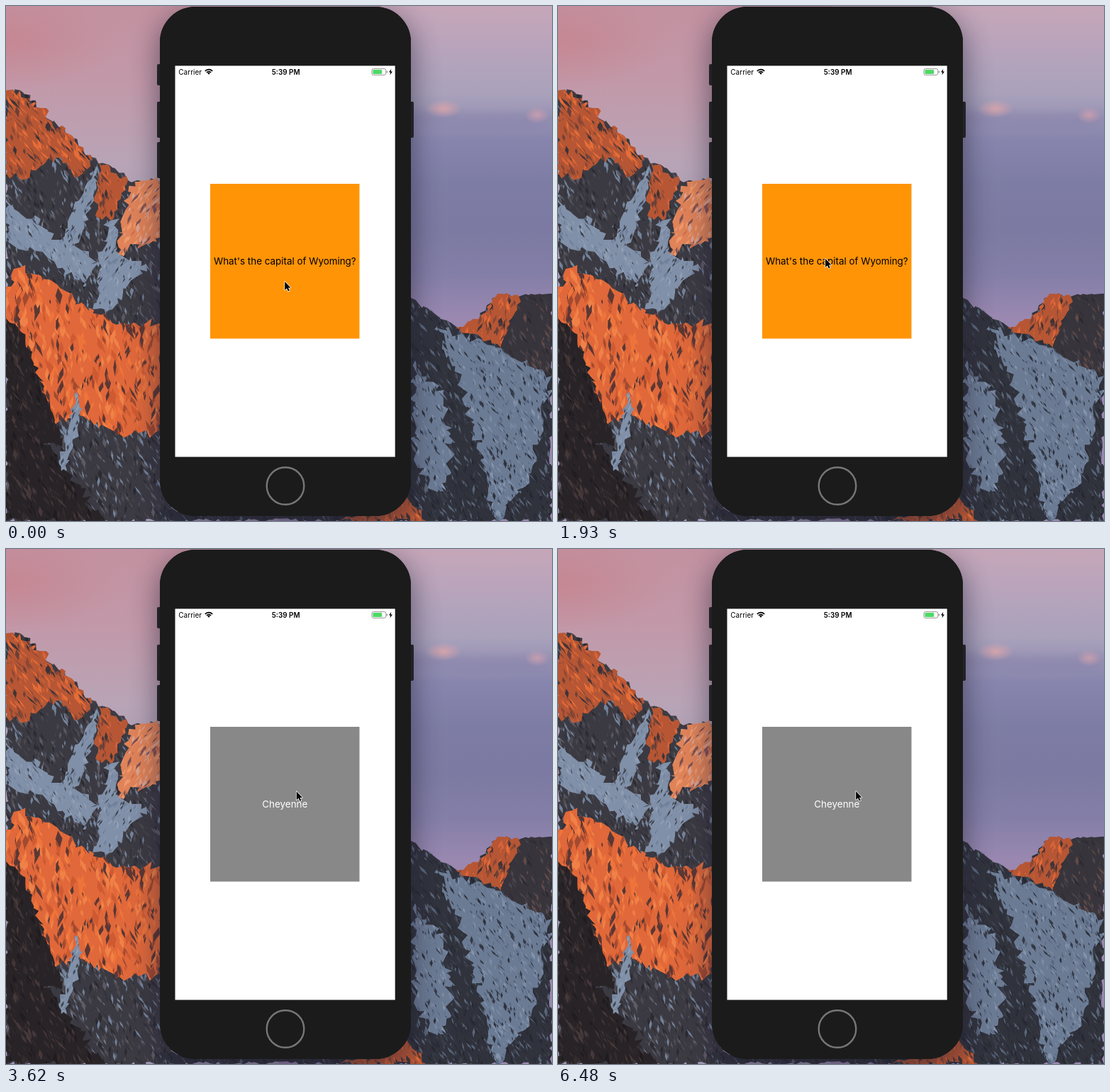
Animation, 770 px wide and 727 px high, one loop 8000 ms. Source, as an HTML page with a canvas:

```html
<!DOCTYPE html>
<html lang="en">
<head>
<meta charset="utf-8">
<title>Flip card</title>
<style>
html, body { margin: 0; width: 100%; height: 100%; overflow: hidden; background: #1b1b1b; }
canvas { display: block; }
</style>
</head>
<body>
<canvas id="stage" width="770" height="727"></canvas>
<script>
const W = 770, H = 727, LOOP = 8000, STEP = 90;
const ctx = document.getElementById('stage').getContext('2d');
const FONT = 'Inter, Roboto, sans-serif';

let seed = 11;
const rnd = () => (seed = (seed * 16807) % 2147483647) / 2147483647;
const spread = a => (rnd() - 0.5) * 2 * a;
const pick = list => list[Math.floor(rnd() * list.length)];

// Closed outline through a few key points, broken up by random offsets
function crag(pts, rough) {
  const path = new Path2D();
  pts.forEach(([x, y], i) => {
    const [nx, ny] = pts[(i + 1) % pts.length];
    const n = Math.ceil(Math.hypot(nx - x, ny - y) / 6);
    for (let k = 0; k < n; k++) {
      const j = k ? rough : 0;
      path.lineTo(x + (nx - x) * k / n + spread(j), y + (ny - y) * k / n + spread(j));
    }
  });
  path.closePath();
  return path;
}

// Rock face: jagged outline filled with thin slanted flakes
function face(g, text, tones, size, lean, rough = 4) {
  const pts = text.split(' ').map(p => p.split(',').map(Number));
  const xs = pts.map(p => p[0]), ys = pts.map(p => p[1]);
  const x0 = Math.min(...xs), y0 = Math.min(...ys);
  const w = Math.max(...xs) - x0, h = Math.max(...ys) - y0;
  g.save();
  g.clip(crag(pts, rough));
  g.fillStyle = tones[0];
  g.fillRect(x0 - 9, y0 - 9, w + 18, h + 18);
  for (let i = w * h / (size * 4); i > 0; i--) {
    const x = x0 + rnd() * w, y = y0 + rnd() * h;
    const len = size * (0.4 + rnd()), half = len * (0.08 + rnd() * 0.14);
    const dx = len * (lean + spread(0.5));
    g.fillStyle = pick(tones);
    g.beginPath();
    g.moveTo(x, y);
    g.lineTo(x + half + dx * 0.4, y + len * 0.45);
    g.lineTo(x + dx, y + len);
    g.lineTo(x - half + dx * 0.5, y + len * 0.5);
    g.fill();
  }
  g.restore();
}

function sky(g, x, colors) {
  const grad = g.createLinearGradient(0, 0, 0, 440);
  colors.forEach((c, i) => grad.addColorStop(i / (colors.length - 1), c));
  g.fillStyle = grad;
  g.fillRect(x, 0, W / 2, H);
}

function glow(g, x, y, rx, ry, rgb, a) {
  g.save();
  g.translate(x, y);
  g.scale(rx, ry);
  const grad = g.createRadialGradient(0, 0, 0, 0, 0, 1);
  grad.addColorStop(0, `rgba(${rgb},${a})`);
  grad.addColorStop(1, `rgba(${rgb},0)`);
  g.fillStyle = grad;
  g.fillRect(-1, -1, 2, 2);
  g.restore();
}

function drawSky(g) {
  sky(g, 0, ['#c391a0', '#c299a9', '#b8a4b6', '#a59bb5', '#a097b4']);
  sky(g, W / 2, ['#c6a6b8', '#b7a4bc', '#a9a1bb', '#8785ad', '#7d7ca4', '#7c7aa2', '#837ea7', '#9a88b0']);
  glow(g, 0, 50, 160, 70, '200,124,132', 0.55);
  for (let x = 576; x < W; x += 18) glow(g, x, 165 + spread(6), 34, 20, '139,134,172', 0.55);
  glow(g, 617, 145, 26, 13, '218,165,170', 0.9);
  glow(g, 749, 154, 18, 12, '206,160,174', 0.85);
}

const ROCK = ['#3b3a42', '#2b2a31', '#4a4850', '#35343d', '#5d5a64', '#74839a'];
const SNOW = ['#8090a8', '#92a0b6', '#71809a', '#3d424e', '#8797ae'];
const FIELD = ['#6b7b94', '#7c8ca5', '#58677f', '#343a47', '#2d313c', '#8494ab'];
const SLATE = ['#30323c', '#262831', '#3c404b', '#2c2e38', '#596679'];
const LIT = ['#e0683a', '#ee743b', '#cf5a31', '#f08248', '#5a3734', '#a24a30'];
const PEAK = ['#b65634', '#e56d38', '#6b4038', '#3e3337', '#d9643a', '#8a4735'];
const GLOW = ['#e08358', '#f09a6c', '#c8694a', '#7a5054', '#dca391'];
const DUSK = ['#282326', '#1f1b1f', '#352c2e', '#2c272b', '#46393a'];

function drawLeft(g) {
  face(g, '0,122 20,119 48,144 118,212 150,228 172,246 230,246 230,727 0,727', ROCK, 11, 0.4);
  face(g, '128,222 124,275 92,352 70,350 96,290', SNOW, 9, -0.3);
  face(g, '0,266 58,318 130,362 112,396 40,345 0,333', SNOW, 9, 0.5, 7);
  face(g, '142,306 160,300 150,345 198,364 150,428 124,420', SNOW, 9, -0.4, 7);
  face(g, '0,122 20,119 48,144 122,218 104,240 70,214 20,244 0,236', PEAK, 13, 0.6, 6);
  face(g, '131,221 172,246 150,302 126,296', PEAK, 11, 0.3);
  face(g, '172,262 188,248 220,246 220,326 158,350', GLOW, 12, -0.5, 6);
  face(g, '0,396 20,369 60,386 104,420 156,450 220,446 220,604 160,604 104,578 70,590 0,470', LIT, 18, 0.1, 6);
  face(g, '0,440 24,462 66,575 84,630 0,600', DUSK, 12, 0.4, 6);
  face(g, '100,545 108,570 84,660 74,655', SNOW, 8, -0.3);
  face(g, '0,582 58,618 140,727 0,727', DUSK, 13, 0.5, 6);
}

function drawRight(g) {
  face(g, '550,405 650,460 690,411 770,406 770,727 215,727 215,712 550,712', SLATE, 11, 0.5);
  face(g, '608,452 738,496 770,522 740,660 690,727 640,530', FIELD, 9, 0.5, 7);
  face(g, '574,500 616,552 632,640 616,700 575,640', FIELD, 9, 0.4, 6);
  face(g, '634,570 660,590 676,650 660,727 610,727', SLATE, 11, 0.4, 8);
  face(g, '690,482 724,412 770,406 770,522', ['#38343b', ...ROCK.slice(0, 4), '#5f4a48'], 11, 0.5);
  face(g, '634,454 666,442 690,411 706,405 724,412 698,482', PEAK, 11, -0.2);
  face(g, '470,727 566,694 592,727', PEAK, 11, 0.3);
}

function pill(g, x, y, w, h, r, color) {
  g.fillStyle = color;
  g.beginPath();
  g.roundRect(x, y, w, h, r);
  g.fill();
}

function label(g, text, x, y, font, color, align = 'center') {
  g.font = `${font} ${FONT}`;
  g.fillStyle = color;
  g.textAlign = align;
  g.fillText(text, x, y);
}

function drawPhone(g) {
  g.save();
  g.shadowColor = 'rgba(30,26,48,.6)';
  g.shadowBlur = 44;
  g.shadowOffsetY = 12;
  pill(g, 217, 1, 354, 719, 50, '#1b1b1b');
  g.restore();
  pill(g, 213, 82, 7, 30, 2, '#222226');
  for (const [x, y] of [[213, 135], [213, 192], [568, 135]]) pill(g, x, y, 7, 51, 2, '#222226');
  pill(g, 217, 1, 354, 719, 50, '#1b1b1b');
  g.fillStyle = '#fff';
  g.fillRect(238.5, 84.4, 310.2, 552.1);
  g.strokeStyle = '#777';
  g.lineWidth = 2.4;
  g.beginPath();
  g.arc(394, 677.5, 26.3, 0, Math.PI * 2);
  g.stroke();
}

function drawStatus(g) {
  label(g, 'Carrier', 243.3, 96.6, '10px', '#000', 'left');
  label(g, '5:39 PM', 394.7, 96.6, '600 9.9px', '#000');

  // Wi-Fi
  g.strokeStyle = '#000';
  for (const r of [1.3, 4.2, 7.2]) {
    g.lineWidth = r < 2 ? 2.6 : 1.6;
    g.beginPath();
    g.arc(286, 96.8, r, -Math.PI * 0.76, -Math.PI * 0.24);
    g.stroke();
  }

  // Battery
  g.strokeStyle = '#8a8a8a';
  g.lineWidth = 0.9;
  g.beginPath();
  g.roundRect(516, 88.6, 19.8, 8.8, 2.2);
  g.stroke();
  pill(g, 517.4, 90, 12.8, 6, 1, '#4cd964');
  pill(g, 536.8, 91.5, 1.2, 3, 0.6, '#8a8a8a');
  g.fillStyle = '#000';
  g.fill(new Path2D('M543.4 88.8 L540 93.6 H542.2 L541.4 97.4 L545 92.4 H542.7 Z'));
}

const scene = document.createElement('canvas');
scene.width = W;
scene.height = H;
const sg = scene.getContext('2d');
[drawSky, drawLeft, drawRight, drawPhone, drawStatus].forEach(draw => draw(sg));

// Short pointer glides, each a curve sampled every STEP ms
const glides = [
  { at: 410, steps: 3, to: [383, 382] },
  { at: 1660, steps: 6, to: [401, 343], via: [349, 362] },
  { at: 3080, steps: 2, to: [406, 341.5] },
  { at: 3620, steps: 2, to: [411, 341] },
  { at: 3880, steps: 4, to: [419, 341] }
];
const arrow = new Path2D('M1.2 1 V13 L4 10.5 L5.9 14.6 L7.8 13.8 L6 9.7 H9.5 Z');

function pointerAt(t) {
  let pos = [392, 388];
  for (const { at, steps, to, via } of glides) {
    if (t < at) break;
    const p = Math.min(steps, Math.floor((t - at) / STEP) + 1) / steps, q = 1 - p;
    pos = pos.map((a, i) => {
      const mid = via ? via[i] : (a + to[i]) / 2;
      return q * q * a + 2 * q * p * mid + p * p * to[i];
    });
  }
  return pos;
}

function drawCard(answer) {
  ctx.fillStyle = answer ? '#888' : '#ff9406';
  ctx.fillRect(288, 251, 210.5, 218.5);
  const text = answer ? 'Cheyenne' : "What's the capital of Wyoming?";
  label(ctx, text, 393.3, 365, '13.4px', answer ? '#fff' : '#000');
}

function drawPointer(t) {
  ctx.save();
  ctx.translate(...pointerAt(t));
  ctx.lineJoin = 'round';
  ctx.lineWidth = 1.5;
  ctx.strokeStyle = '#fff';
  ctx.stroke(arrow);
  ctx.fillStyle = '#000';
  ctx.fill(arrow);
  ctx.restore();
}

const start = performance.now();
function frame() {
  const t = Math.max(0, performance.now() - start) % LOOP;
  ctx.drawImage(scene, 0, 0);
  drawCard((t >= 2460 && t < 4600) || t >= 6480);
  drawPointer(t);
  requestAnimationFrame(frame);
}
frame();
</script>
</body>
</html>
```
